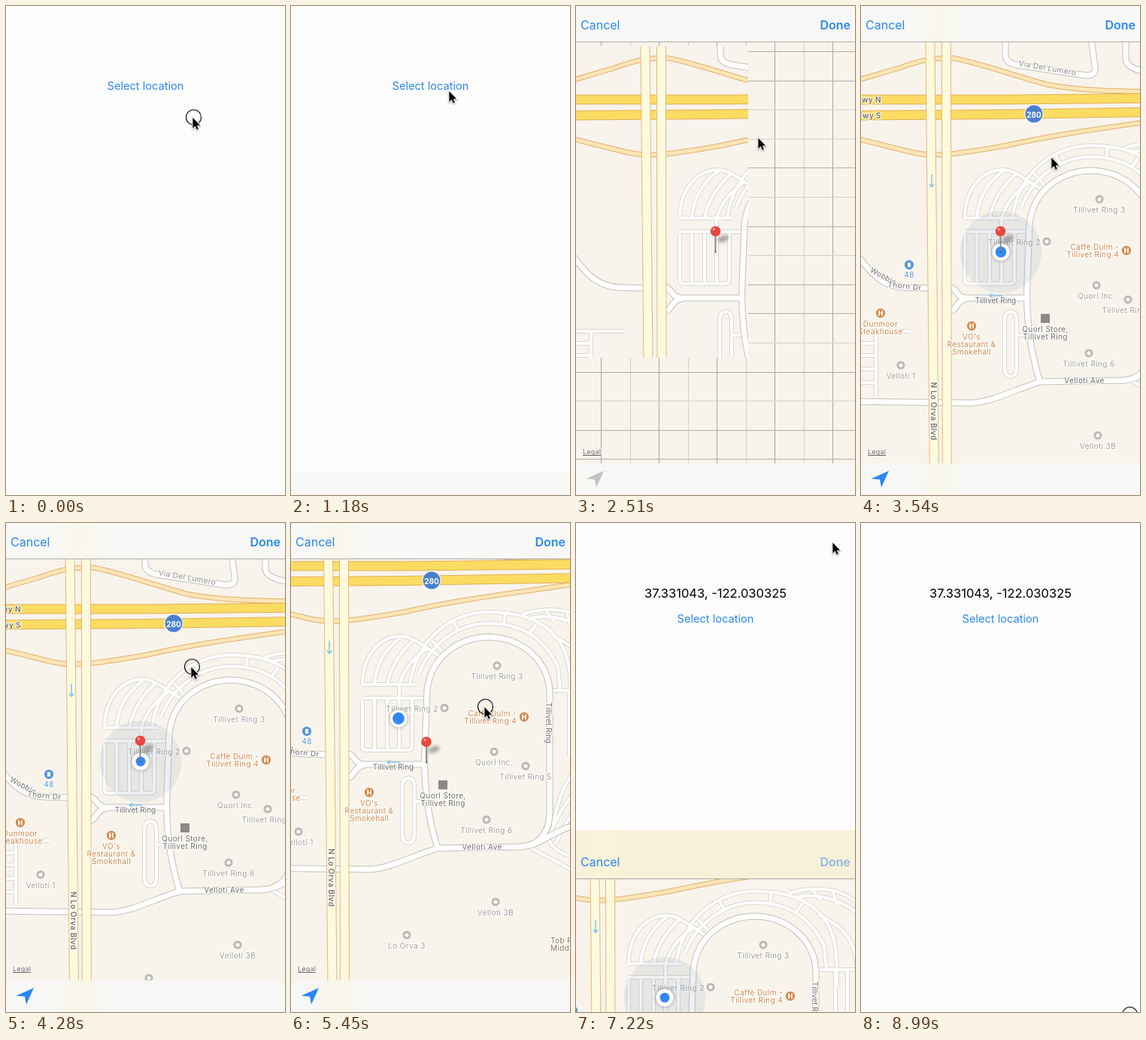
Recreate the animation shown at these times as an HTML page with a canvas. Size 371 by 648 pixels, loop 9.09 s.

```html
<!DOCTYPE html>
<html lang="en">
<head>
<meta charset="utf-8">
<title>Location picker</title>
<style>
html, body { margin: 0; width: 100%; height: 100%; overflow: hidden; background: #fdfdfd; }
canvas { display: block; width: 371px; height: 648px; }
</style>
</head>
<body>
<canvas id="stage"></canvas>
<script>
const W = 371, H = 648, LOOP = 9090, STEP = 147.4;
const BLUE = '#2b87f3', GRAY = '#a09f9c', DARK = '#6f6e6c', ORANGE = '#d58a4c';
const canvas = document.getElementById('stage');
const ctx = canvas.getContext('2d');
const ratio = window.devicePixelRatio || 1;
canvas.width = W * ratio;
canvas.height = H * ratio;

// Tracks: [step, x, y], linear between keys.
const mapTrack = [[28, 43, 67], [29, 36, 57], [30, 24, 38], [31, 11, 17], [32, 5, 8],
  [36, 5, 8], [37, 0, 0], [38, -9, -19], [39, -20, -43], [40, -25, -54]];
const cursorTrack = [[0, 247, 147], [1, 244, 145], [5, 209, 112], [14, 209, 112], [17, 241, 174],
  [18, 247, 188], [23, 252, 200], [28, 252, 200], [29, 245, 190], [30, 233, 171], [31, 220, 150],
  [32, 214, 141], [34, 261, 251], [36, 261, 251], [37, 256, 243], [38, 247, 224], [39, 236, 200],
  [40, 231, 189], [43, 340, 25], [51, 340, 25], [55, 358, 330], [58, 355, 651]];
const presses = [[0, 1], [7, 8], [28, 32], [36, 40], [44, 46], [61, 62]];

function at(track, k) {
  if (k <= track[0][0]) return track[0].slice(1);
  for (let i = 1; i < track.length; i++) {
    const [k0, x0, y0] = track[i - 1], [k1, x1, y1] = track[i];
    if (k <= k1) {
      const p = (k - k0) / (k1 - k0);
      return [x0 + (x1 - x0) * p, y0 + (y1 - y0) * p];
    }
  }
  return track[track.length - 1].slice(1);
}

// Remaining share of a critically damped slide.
function settle(ms) {
  const x = Math.max(0, ms) * 0.017;
  return (1 + x) * Math.exp(-x);
}

const lots = [
  'M95 214H165', 'M95 214C95 180 114 151 145 150C160 150 172 160 198 177',
  'M111 214C113 188 126 166 147 151', 'M128 214C134 186 147 170 164 154',
  'M144 214C150 194 163 178 182 166', 'M158 214C168 150 215 119 262 118C300 118 330 126 352 150C372 175 372 200 372 245',
  'M170 200C186 158 225 133 262 133C305 133 335 150 355 190L358 222',
  'M187 155L200 169', 'M216 131L223 144', 'M285 120L283 136', 'M326 134L317 147',
  'M308 121C330 113 370 110 396 131', 'M318 126C345 120 375 128 398 146', 'M340 117L350 130M366 116L372 136',
  'M348 222H400', 'M370 222V310M386 222V316', 'M348 150C385 165 398 190 399 222',
  'M95 232H178', 'M95 236V296Q95 301 100 301H156Q161 301 161 296V232',
  'M111 232V301M128 232V301M144 214V301', 'M148 350Q148 338 156 338Q164 338 164 350V412Q164 424 156 424Q148 424 148 412Z',
  'M164 369H178', 'M-60 364H22M-23 364V450M-60 380H-23M-60 396H-23M-60 414H-23M-60 432H-23',
  'M348 400C360 345 375 325 400 312', 'M340 415C352 440 375 446 400 444', 'M346 408C362 370 380 350 400 338',
  'M352 425C365 396 380 372 400 362', 'M318 430L400 474'
].map(d => new Path2D(d));
const streets = [
  'M-60 248C-35 280 -20 305 15 306L50 307', 'M76 306C84 306 84 320 98 320H178',
  'M76 337C84 337 84 322 98 321', 'M195 431C182 390 176 350 178 300L181 222C186 175 225 152 262 151C310 152 343 185 344 225V385C343 415 325 428 305 429L195 431',
  'M-60 457L105 459C130 458 160 442 195 431', 'M305 429C335 428 345 405 400 395',
  'M149 -25V-2Q149 8 164 11L255 25Q270 26 268 14L263 -25', 'M309 -25V4Q310 14 330 19L410 34'
].map(d => new Path2D(d));
const ramps = ['M-60 35L8 15C40 4 50 2 78 2C100 4 150 22 204 37C250 46 300 46 410 48',
  'M-60 106L17 125C50 134 75 131 150 118C230 100 290 94 410 76'].map(d => new Path2D(d));
const freeways = ['M-60 57H150L410 54.5', 'M-60 78L150 76.5L410 72.5'].map(d => new Path2D(d));
const avenues = ['M48.6 -60L55.5 670', 'M70.3 -60L71.5 670'].map(d => new Path2D(d));

function roads(paths, width, fill, edge) {
  ctx.lineJoin = 'round';
  for (const [w, color] of [[width, edge], [width - 2, fill]]) {
    ctx.lineWidth = w;
    ctx.strokeStyle = color;
    paths.forEach(p => ctx.stroke(p));
  }
}

function disc(x, y, r, color) {
  ctx.fillStyle = color;
  ctx.beginPath();
  ctx.arc(x, y, r, 0, Math.PI * 2);
  ctx.fill();
}

function write(s, x, y, size, color, { weight = 400, align = 'center', turn = 0, halo = false, gap = 0 } = {}) {
  ctx.save();
  ctx.translate(x, y);
  ctx.rotate(turn);
  ctx.font = `${weight} ${size}px Inter, Roboto, sans-serif`;
  ctx.textAlign = align;
  ctx.textBaseline = 'alphabetic';
  ctx.letterSpacing = gap + 'px';
  if (halo) {
    ctx.lineWidth = 2.5;
    ctx.lineJoin = 'round';
    ctx.strokeStyle = 'rgba(255,255,255,.8)';
    ctx.strokeText(s, 0, size * 0.36);
  }
  ctx.fillStyle = color;
  ctx.fillText(s, 0, size * 0.36);
  ctx.restore();
}

function label(s, x, y, color = GRAY, opts = {}) {
  write(s, x, y, 10, color, { halo: true, gap: 0.4, ...opts });
}

function place(s, x, y) {
  disc(x, y, 5.5, '#b9b8b5');
  disc(x, y, 2.6, '#fff');
  label(s, x, y + 14);
}

function badge(x, y, color, food) {
  disc(x, y, 7, '#fff');
  disc(x, y, 6.2, color);
  ctx.fillStyle = '#fff';
  if (food) {
    ctx.fillRect(x - 2.8, y - 3.5, 1.8, 7);
    ctx.fillRect(x + 1.2, y - 3.5, 1.6, 7);
    ctx.fillRect(x - 2, y - 0.5, 4, 1);
  } else {
    ctx.fillRect(x - 2, y - 3, 4, 6);
  }
}

function arrow(x, y, turn) {
  ctx.save();
  ctx.translate(x, y);
  ctx.rotate(turn);
  ctx.strokeStyle = '#83c3ee';
  ctx.lineWidth = 1.5;
  ctx.stroke(new Path2D('M-9 0H8M4 -3L8 0L4 3'));
  ctx.restore();
}

function drawRoads() {
  roads(lots, 6, '#fff', '#dad8d3');
  roads(streets, 9, '#fff', '#c3c0bb');
  roads(ramps, 7, '#fce6b6', '#e4ad69');
  roads(freeways, 13, '#fbdc62', '#e3ad58');
  roads(avenues, 13, '#fefade', '#ebb675');
}

function drawLabels() {
  arrow(51, 165, Math.PI / 2);
  arrow(136, 317, Math.PI);
  disc(187, 76, 12.5, '#fff');
  disc(187, 76, 11.5, '#4a80cf');
  write('280', 187, 77, 10, '#fff', { weight: 700 });
  label('Fwy N', -16, 57, DARK, { align: 'right', weight: 600 });
  label('Fwy S', -16, 78, DARK, { align: 'right', weight: 600 });
  label('Via Del Lumero', 205, 15, '#8b8a88', { turn: 0.17 });
  label('Wobbin', -13, 291, DARK, { turn: 0.5 });
  label('Thorn Dr', 15, 304, DARK, { turn: 0.1 });
  label('N Lo Orva Blvd', 54, 470, DARK, { turn: Math.PI / 2, weight: 600 });
  label('Tillivet Ring', 136, 323, DARK, { gap: 0 });
  label('Tillivet Ring', 343, 265, DARK, { turn: Math.PI / 2, gap: 0 });
  label('Velloti Ave', 254, 429, DARK);

  disc(204, 245, 5.5, '#b9b8b5');
  disc(204, 245, 2.6, '#fff');
  label('Tillivet Ring 2', 161, 246);
  place('Tillivet Ring 3', 274, 189);
  place('Quorl Inc.', 270, 303);
  place('Tillivet Ring 5', 312, 322);
  place('Tillivet Ring 6', 260, 393);
  place('Velloti 1', 10, 409);
  place('Velloti 3B', 272, 502);
  place('Lo Orva 3', 154, 546);

  badge(310, 257, ORANGE, true);
  label('Caffè Dulm -', 300, 252, ORANGE, { align: 'right' });
  label('Tillivet Ring 4', 300, 262, ORANGE, { align: 'right' });
  badge(104, 357, ORANGE, true);
  ["VO's", 'Restaurant &', 'Smokehall'].forEach((s, i) => label(s, 104, 371 + i * 10, ORANGE));
  badge(-17, 340, ORANGE, true);
  label('Dunmoor', -17, 354, ORANGE);
  label('Steakhouse', -17, 364, ORANGE);
  badge(21, 276, '#5d95d8', false);
  label('48', 21, 289, '#5d95d8');
  ctx.fillStyle = '#8b8a88';
  ctx.fillRect(196, 341, 12, 12);
  label('Quorl Store,', 202, 361, DARK);
  label('Tillivet Ring', 202, 371, DARK);
  label('Tob Rellan', 345, 553, '#92704f', { align: 'left' });
  label('Middle School', 345, 563, '#92704f', { align: 'left' });
}

function drawGrid() {
  const lightRows = [2, 3, 5, 7, 10, 12];
  for (let i = 0; i < 9; i++) {
    ctx.fillStyle = i % 2 ? '#d2cec8' : '#aaa69f';
    ctx.fillRect(Math.round(33 + i * 38.5), 47, 1, 559);
  }
  for (let i = 0; i < 15; i++) {
    ctx.fillStyle = lightRows.includes(i) ? '#d5d1cb' : '#b1ada6';
    ctx.fillRect(0, Math.round(60 + i * 38.6), W, 1);
  }
}

function drawDot(k, x, y) {
  if (k < 33 || k >= 41) disc(x, y, 54, 'rgba(125,150,172,.15)');
  ctx.save();
  ctx.shadowColor = 'rgba(0,0,0,.35)';
  ctx.shadowBlur = 5 * ratio;
  disc(x, y, 11.5, '#fff');
  ctx.restore();
  disc(x, y, 7.3 - 0.8 * Math.cos((k - 29) * Math.PI / 10), '#3486f5');
}

function drawPin(x, y) {
  ctx.save();
  ctx.translate(x, y);
  ctx.save();
  ctx.filter = 'blur(2px)';
  ctx.fillStyle = 'rgba(60,55,50,.42)';
  ctx.beginPath();
  ctx.ellipse(10, -18, 8, 4, -0.35, 0, Math.PI * 2);
  ctx.fill();
  ctx.restore();
  ctx.fillStyle = '#858482';
  ctx.fillRect(-0.9, -22, 1.8, 22);
  ctx.fillStyle = '#55504c';
  ctx.fillRect(-0.9, -1.5, 1.8, 1.8);
  disc(0, -28, 6.8, '#e6483f');
  disc(-2, -30.5, 1.7, '#f6a49d');
  ctx.restore();
}

function drawMap(k) {
  ctx.save();
  ctx.beginPath();
  ctx.rect(0, 47, W, 559);
  ctx.clip();
  ctx.fillStyle = '#f8f4ec';
  ctx.fillRect(0, 47, W, 559);
  const [ox, oy] = at(mapTrack, k);
  if (k >= 14 && k < 18) drawGrid();
  if (k >= 16) {
    ctx.save();
    if (k < 18) {
      ctx.beginPath();
      ctx.rect(0, 53, 229, 413);
      ctx.clip();
      ctx.fillStyle = '#f8f3ed';
      ctx.fillRect(0, 53, 229, 413);
    }
    ctx.translate(ox, oy);
    drawRoads();
    if (k >= 20) drawLabels();
    ctx.restore();
  }
  ctx.save();
  ctx.translate(ox, oy);
  if (k >= 23) drawDot(k, 143, 259);
  if (k >= 14) drawPin(...(k < 33 ? [142.5, 259.5] : k < 41 ? [180, 318] : [210, 380]));
  ctx.restore();
  write('Legal', 9, 591, 9, '#64625f', { align: 'left', halo: k >= 16, gap: 0.2 });
  ctx.fillStyle = '#64625f';
  ctx.fillRect(9, 595, 24, 1);
  ctx.restore();
}

function drawBars(k) {
  const [ox, oy] = at(mapTrack, k);
  const tint = Math.min(1, Math.max(0, -oy / 54));
  ctx.fillStyle = `rgb(248,${248 - 7 * tint},${246 - 29 * tint})`;
  ctx.fillRect(0, -17, W, 64);
  ctx.fillStyle = '#f7f7f5';
  ctx.fillRect(0, 606, W, 44);
  if (k >= 20) {
    // The avenue glows faintly through both bars.
    const glow = ctx.createLinearGradient(ox + 30, 0, ox + 92, 0);
    glow.addColorStop(0, 'rgba(252,246,218,0)');
    glow.addColorStop(0.5, 'rgba(252,246,218,.45)');
    glow.addColorStop(1, 'rgba(252,246,218,0)');
    ctx.fillStyle = glow;
    ctx.fillRect(0, -17, W, 64);
    ctx.fillRect(0, 606, W, 44);
  }
  ctx.fillStyle = '#adaba7';
  ctx.fillRect(0, 47, W, 1);
}

function drawSheet(k, offset) {
  ctx.save();
  ctx.translate(0, Math.round(offset));
  drawMap(k);
  drawBars(k);
  write('Cancel', 6, 25, 16, BLUE, { align: 'left' });
  write('Done', 365, 25, 16, k >= 44 ? '#8cb8e4' : BLUE, { align: 'right', weight: 600 });
  ctx.fillStyle = k >= 23 ? BLUE : '#c2c2c1';
  ctx.fill(new Path2D('M37 616L13.5 626.5L25 627.5L27 638Z'));
  ctx.restore();
}

function drawCursor(k) {
  const [x, y] = at(cursorTrack, k);
  if (presses.some(([a, b]) => k >= a && k < b)) {
    ctx.strokeStyle = '#111';
    ctx.lineWidth = 1.2;
    ctx.beginPath();
    ctx.arc(x + 2.5, y + 0.5, 10, 0, Math.PI * 2);
    ctx.stroke();
  }
  ctx.save();
  ctx.translate(x + 0.5, y + 1);
  ctx.scale(0.87, 0.87);
  const shape = new Path2D('M1 0V16L4.7 12.6L7.2 18L9.6 17L7.2 11.7H12.3Z');
  ctx.shadowColor = 'rgba(0,0,0,.4)';
  ctx.shadowBlur = 2 * ratio;
  ctx.shadowOffsetY = ratio;
  ctx.strokeStyle = '#fff';
  ctx.lineWidth = 2;
  ctx.stroke(shape);
  ctx.shadowColor = 'transparent';
  ctx.fillStyle = '#000';
  ctx.fill(shape);
  ctx.restore();
}

function draw(ms) {
  const k = Math.floor((ms % LOOP + 6) / STEP);
  const now = k * STEP;
  const picked = k >= 45;
  ctx.setTransform(ratio, 0, 0, ratio, 0, 0);
  ctx.fillStyle = '#fdfdfd';
  ctx.fillRect(0, 0, W, H);
  if (picked) write('37.331043, -122.030325', 185.5, 93, 16.5, '#000');
  write('Select location', 185.5, picked ? 127 : 106, 14.6, k === 7 ? '#b9d8fa' : BLUE);
  const offset = 665 * (k < 45 ? settle(now - 1159) : 1 - settle(now - 7095));
  if (k >= 8 && offset < 664) drawSheet(k, offset);
  drawCursor(k);
}

const start = performance.now();
function tick() {
  draw(performance.now() - start);
  requestAnimationFrame(tick);
}
tick();
</script>
</body>
</html>
```
